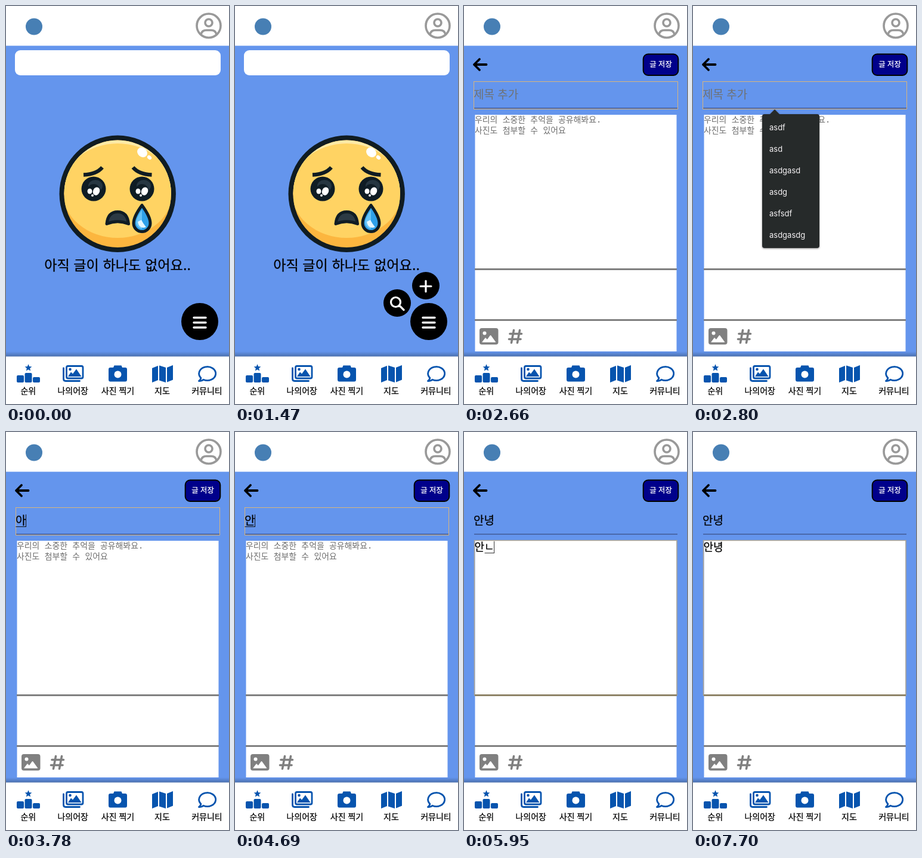
These frames come from a looping animation (374x666 px, 8 s). An HTML page:

```html
<!DOCTYPE html>
<html lang="ko">
<head>
<meta charset="utf-8">
<style>
  html, body { margin: 0; width: 100%; height: 100%; overflow: hidden; }
  svg { display: block; width: 100vw; height: 100vh; }
  text { font-family: "Noto Sans CJK KR", "Noto Sans CJK", "Noto Sans", sans-serif; white-space: pre; }
  .line { fill: none; stroke-linecap: round; stroke-linejoin: round; }
  .mono { font: 13.9px "Liberation Mono", "Noto Sans CJK KR", monospace; fill: #6c6c6c; }
  .heavy { stroke: #000; stroke-width: .25; }
  .tab { font-size: 14px; text-anchor: middle; }
  .option { font: 13px Inter, sans-serif; fill: #f4f4f4; }
</style>
</head>
<body>
<svg viewBox="0 0 374 666">
  <defs>
    <linearGradient id="navShadow" x2="0" y2="1">
      <stop offset="0" stop-color="#234" stop-opacity="0"/>
      <stop offset="1" stop-color="#234" stop-opacity=".4"/>
    </linearGradient>
    <filter id="drop" x="-20%" y="-20%" width="140%" height="140%">
      <feDropShadow dx="0" dy="1" stdDeviation="1.5" flood-opacity=".45"/>
    </filter>
    <clipPath id="face"><circle cx="187.2" cy="314.3" r="89.7"/></clipPath>
    <g id="eye">
      <circle r="20.5" fill="#0f1c24"/>
      <ellipse cx="3" cy="-5" rx="12" ry="10" fill="#263641"/>
      <circle cx="0" cy="3" r="11" fill="#0f1c24"/>
      <g fill="#fff">
        <ellipse cx="4.5" cy="4" rx="5.5" ry="7" transform="rotate(25 4.5 4)"/>
        <ellipse cx="-6.500" cy="4" rx="4" ry="4.500"/>
        <circle cx="-2" cy="11" r="2"/>
      </g>
    </g>
  </defs>

  <rect width="374" height="666" fill="#6495ed"/>

  <g id="listPage">
    <rect x="15" y="74" width="345" height="42" rx="9" fill="#fff"/>
    <circle cx="187.2" cy="314.3" r="97.7" fill="#101c22"/>
    <g clip-path="url(#face)">
      <circle cx="187.2" cy="314.3" r="91" fill="#fcb63f"/>
      <ellipse cx="187.2" cy="300" rx="91" ry="87" fill="#ffeaa6"/>
      <ellipse cx="187.2" cy="309" rx="93" ry="79" fill="#ffd363"/>
    </g>
    <g fill="#fff">
      <ellipse cx="228.5" cy="245" rx="9" ry="7.500" transform="rotate(40 228.5 245)"/>
      <ellipse cx="240.5" cy="253.5" rx="4" ry="3" transform="rotate(40 240.5 253.5)"/>
    </g>
    <path d="M130 282.500Q152 281.500 161.500 270M244.500 282.500Q222.500 281.500 213 270" fill="none" stroke="#101c22" stroke-width="6.300"/>
    <use href="#eye" x="147" y="306"/>
    <use href="#eye" x="228" y="306"/>
    <g stroke="#0f1c24" stroke-width="5" stroke-linejoin="round">
      <path d="M169 364.500Q171 344.500 187.200 344.500T205.500 364.500Q187.200 357 169 364.500Z" fill="#2c3a44"/>
      <path d="M228 333.500Q214 352.500 214 363.500A14 14 0 0 0 242 363.500Q242 352.500 228 333.500Z" fill="#2fa0e8"/>
    </g>
    <path d="M228 341Q218 355 218 363Q220 372 228 373Z" fill="#69c4f7"/>
    <path d="M221 361Q223 374 235 370Q230 364 227 358Z" fill="#e3f6ff"/>
    <text class="heavy" x="187" y="441.500" font-size="23.200" text-anchor="middle">아직 글이 하나도 없어요..</text>

    <g id="addButton">
      <circle r="23"/>
      <path class="line" d="M-9 1H9M0-8V10" stroke="#fff" stroke-width="3.200"/>
    </g>
    <g id="searchButton">
      <circle r="23"/>
      <path class="line" d="M3.500 4L11 11.500M5.500-1.500A8 8 0 1 1-10.500-1.500A8 8 0 1 1 5.500-1.500" stroke="#fff" stroke-width="3.200"/>
    </g>
    <circle cx="325" cy="528" r="31"/>
    <path class="line" d="M315 521.500H335M315 529.700H335M315 538H335" stroke="#fff" stroke-width="3.400"/>
  </g>

  <g id="editPage">
    <path class="line" d="M17 98H37.500M26 89L17 98L26 107" stroke="#000" stroke-width="3.800"/>
    <rect x="300.700" y="80.500" width="58.600" height="35.500" rx="8" fill="#00008b" stroke="#000" stroke-width="2"/>
    <text x="330" y="101.500" font-size="12.400" text-anchor="middle" fill="#fff" stroke="#fff" stroke-width=".25">글 저장</text>

    <rect x="17" y="170" width="341" height="2" fill="#4a68ab"/>
    <rect id="titleFocus" x="16.500" y="126.500" width="342" height="46" fill="none" stroke="#d9b57c"/>
    <text id="titleHint" x="16" y="155" font-size="19" fill="#6f7275">제목 추가</text>

    <rect x="18.500" y="182" width="338" height="396" fill="#fff"/>
    <path d="M18 440.500H357M18 525.500H357" stroke="#808080" stroke-width="3"/>
    <g id="bodyFocus" fill="none" stroke="#b3a78f">
      <rect x="17.500" y="181.500" width="339.500" height="259" stroke-width="1.400"/>
      <path d="M18 440.500H357" stroke="#8f8468" stroke-width="3"/>
    </g>
    <g id="bodyHint">
      <text class="mono" x="18" y="195">우리의 소중한 추억을 공유해봐요.</text>
      <text class="mono" x="18" y="212.500">사진도 첨부할 수 있어요</text>
    </g>
    <g id="titleField"><text class="heavy"/><path stroke="#111"/><path stroke="#111"/></g>
    <g id="bodyField"><text class="heavy"/><path stroke="#333"/><path stroke="#333"/></g>

    <rect x="26" y="539" width="31.500" height="27.500" rx="4" fill="#808080"/>
    <circle cx="34.500" cy="547.500" r="3" fill="#fff"/>
    <path class="line" d="M31 562L36 555.500L39 558.500L44.500 551L52.500 562Z" style="fill:#fff" stroke="#fff"/>
    <path class="line" d="M83.500 542.500L79.500 563.500M93.500 542.500L89.500 563.500M77 548.500H96.500M75.500 557.500H95" stroke="#808080" stroke-width="3.600"/>

    <g id="suggestions" filter="url(#drop)">
      <path d="M128 182L137 173L146 182Z" fill="#28292b"/>
      <rect x="116" y="181" width="96" height="224" rx="4" fill="#28292b"/>
    </g>
  </g>

  <rect width="374" height="66.500" fill="#fff"/>
  <circle cx="47" cy="34.500" r="14" fill="#477fb4"/>
  <g fill="none" stroke="#999" stroke-width="3.600">
    <circle cx="340" cy="33" r="20"/>
    <circle cx="340" cy="28" r="6"/>
    <path d="M327 47.500Q328.500 40.500 336 40.500H344Q351.500 40.500 353 47.500"/>
  </g>

  <rect y="578" width="374" height="9" fill="url(#navShadow)"/>
  <rect y="586.500" width="374" height="79.500" fill="#fff"/>
  <g fill="#0754ae">
    <path id="star"/>
    <rect x="18" y="618" width="12" height="12" rx="2"/>
    <rect x="31.500" y="614" width="12" height="16" rx="2"/>
    <rect x="45" y="621" width="12" height="9" rx="2"/>
    <path d="M104 620L109 612.500L112 615.500L118 607.500L126.500 620Z"/>
    <circle cx="107.500" cy="608" r="2.300"/>
    <path d="M180 605L181.500 601.500H193.500L195 605H200Q203 605 203 608V625Q203 628.500 200 628.500H175Q172 628.500 172 625V608Q172 605 175 605Z"/>
    <circle cx="187.500" cy="616.500" r="6" fill="#fff"/>
    <path d="M245 606L255 602V626L245 630ZM257 601.500L268 605V630L257 626.500ZM270 605L280 601V625.500L270 629.500Z"/>
  </g>
  <g class="line" stroke="#0754ae" stroke-width="2.800">
    <rect x="101.500" y="602.500" width="27.500" height="20.500" rx="2.500"/>
    <path d="M96.500 606V624Q96.500 627.500 100 627.500H123.500"/>
    <path d="M327 622.500Q326 626 323.500 627.500Q328.500 627.500 331 625.200A14 11.500 0 1 0 327 622.500Z"/>
  </g>
  <g class="heavy">
    <text class="tab" x="37.300" y="648.500">순위</text>
    <text class="tab" x="112.200" y="648.500">나의어장</text>
    <text class="tab" x="187.500" y="648.500">사진 찍기</text>
    <text class="tab" x="262" y="648.500">지도</text>
    <text class="tab" x="337" y="648.500">커뮤니티</text>
  </g>
</svg>

<script>
const LOOP = 8000;
const HANGUL_WIDTH = 0.92;
const $ = id => document.getElementById(id);
const show = (id, on) => $(id).style.display = on ? '' : 'none';

// [time, text] steps of the input method composing each syllable
const titleTyping = [[3710, 'ㅇ'], [3780, '아'], [3850, '안'], [4200, '아'], [4340, 'ㅇ'],
  [4550, '아'], [4690, '안'], [4900, '안ㄴ'], [5040, '안녕']];
const bodyTyping = [[5600, 'ㅇ'], [5670, '아'], [5740, '안'], [5950, '안ㄴ'], [6020, '안녀'], [6160, '안녕']];

const textAt = (steps, t) => steps.reduce((text, [time, next]) => t >= time ? next : text, '');

function drawField(id, text, x, baseline, size, caret, composing) {
  const [label, caretLine, underline] = $(id).children;
  const end = x + text.length * HANGUL_WIDTH * size;
  label.textContent = text;
  label.setAttribute('x', x);
  label.setAttribute('y', baseline);
  label.setAttribute('font-size', size);
  caretLine.setAttribute('d', text && caret ? `M${end} ${baseline - size * 0.9}V${baseline + 4}` : '');
  underline.setAttribute('d', text && composing
    ? `M${end - HANGUL_WIDTH * size + 0.5} ${baseline + 3.5}H${end}` : '');
}

function placeBubble(id, x, y, p) {
  show(id, p > 0);
  $(id).setAttribute('transform', `translate(${325 + (x - 325) * p} ${528 + (y - 528) * p})`);
}

function render(t) {
  const editing = t >= 1540;
  show('listPage', !editing);
  show('editPage', editing);

  const open = Math.min(1, Math.max(0, (t - 1200) / 260));
  const eased = t < 1260 ? 0 : 1 - (1 - open) ** 2;
  placeBubble('addButton', 320, 468, eased);
  placeBubble('searchButton', 272, 497, eased);

  const titleFocused = t >= 2660 && t < 5250;
  const bodyFocused = t >= 5250;
  show('titleFocus', titleFocused);
  show('bodyFocus', bodyFocused);
  show('suggestions', t >= 2800 && t < 3710);

  const title = textAt(titleTyping, t);
  const body = textAt(bodyTyping, t);
  show('titleHint', !title);
  show('bodyHint', !body);
  const caretOn = t < 6650 || (t >= 7210 && t < 7700);
  drawField('titleField', title, 16, 155, 19, titleFocused, titleFocused);
  drawField('bodyField', body, 17.5, 199, 18, caretOn, t < 7700);
}

$('star').setAttribute('d', 'M' + Array.from({ length: 10 }, (_, i) => {
  const r = i % 2 ? 2.8 : 6.2, a = i * Math.PI / 5;
  return `${37.5 + r * Math.sin(a)} ${605.5 - r * Math.cos(a)}`;
}).join('L') + 'Z');

['asdf', 'asd', 'asdgasd', 'asdg', 'asfsdf', 'asdgasdg'].forEach((word, i) => {
  const option = document.createElementNS('http://www.w3.org/2000/svg', 'text');
  option.setAttribute('class', 'option');
  option.setAttribute('x', 128);
  option.setAttribute('y', 207.5 + 36 * i);
  option.textContent = word;
  $('suggestions').append(option);
});

const start = performance.now();
function tick() {
  render((performance.now() - start) % LOOP);
  requestAnimationFrame(tick);
}
tick();
</script>
</body>
</html>
```
